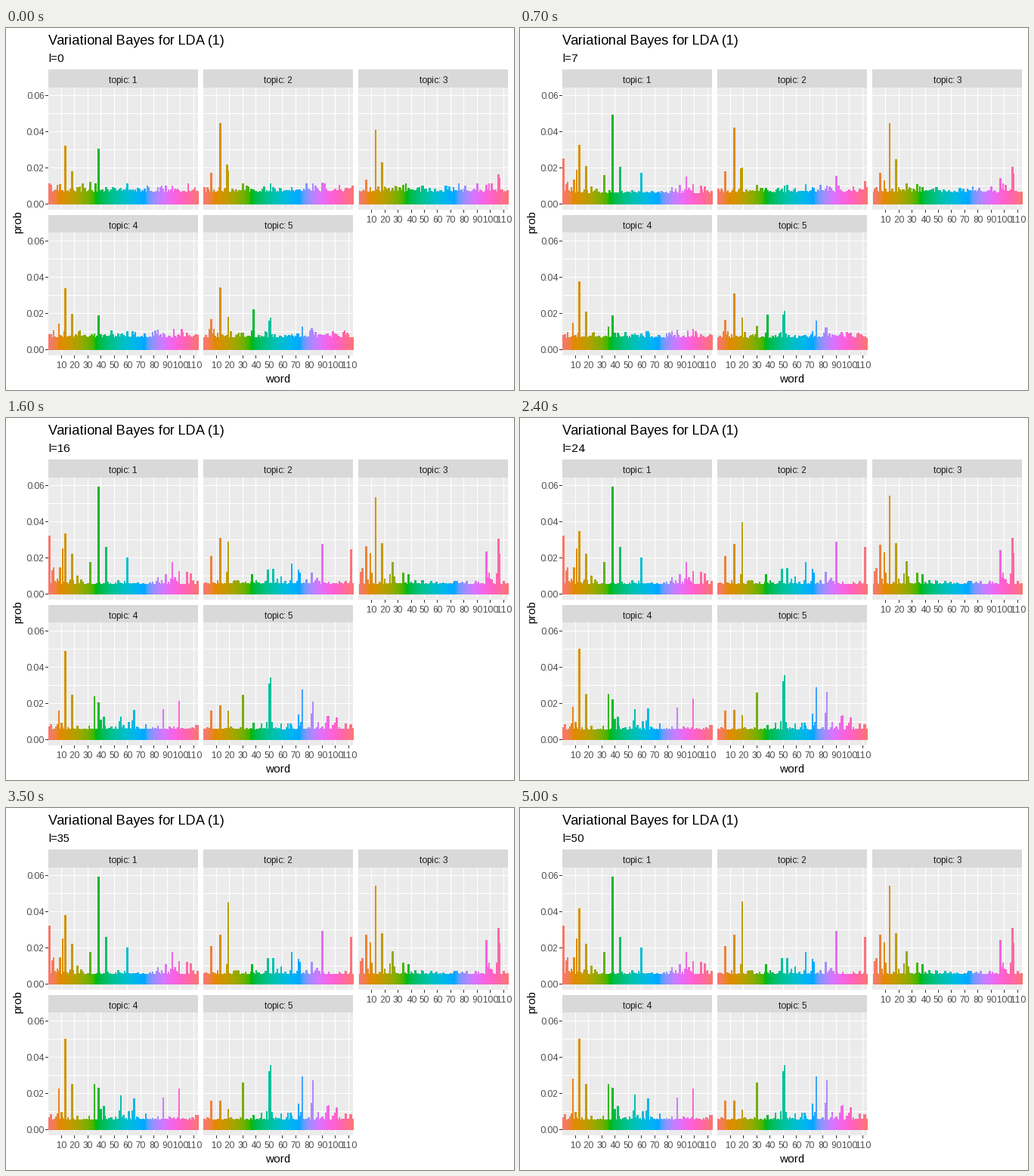
Animation, 672 px wide and 480 px high, one loop 5100 ms. Source, as a matplotlib script:

```python
import math

import matplotlib.pyplot as plt
import numpy as np
from matplotlib.animation import FuncAnimation
from matplotlib.collections import PolyCollection
from matplotlib.patches import Rectangle

W, H, DPI = 672, 480, 96
STEPS = 51
TOPICS, WORDS = 5, 113
PANEL_W, COL_STEP = 197.82, 205.13
WORD_PX = PANEL_W / (WORDS + 0.2)
PROB_PX = 2400

# Strip top, panel top, panel bottom and zero line of each row.
ROWS = [(55, 79, 241, 233.5), (248, 271, 434, 426.5)]

# Step at which each topic is half settled, and the word its small bars favour.
HALFWAY = [6, 10, 9, 10, 10]
FOCUS = [5, 60, 10, 35, 80]

# Leading words: word, first and last height in thousandths, own halfway step.
PEAKS = [
    [(1, 11, 32), (11, 7, 25), (13, 32, 43, 34), (18, 18, 22), (32, 12, 17.5),
     (38, 30, 59), (44, 9, 26), (60, 11, 20), (94, 10, 17.5)],
    [(6, 17, 21), (13, 45, 27, 12), (18, 22, 11), (19, 18, 45.5, 18),
     (67, 9, 17.5), (90, 11.5, 29), (112, 8.5, 26)],
    [(6, 13, 27), (9, 9, 23), (13, 40.5, 54), (18, 23, 28), (26, 8.5, 18),
     (97, 10, 24), (106, 16, 31), (107, 14, 22.5)],
    [(8, 14, 30, 34), (13, 33.5, 50), (18, 19.5, 25), (35, 8.5, 25),
     (38, 18.5, 23, 18), (55, 8, 19, 18), (65, 8, 17), (87, 9, 17.5), (99, 8, 22.5)],
    [(6, 16.5, 16), (13, 34.5, 16, 11), (19, 18, 11, 20), (30, 9, 26),
     (38, 22.5, 8), (50, 15.5, 32), (51, 17, 35.5), (75, 12, 29), (83, 10, 27, 14)],
]


def hue_color(i):
    """Evenly spaced hue at luminance 65 and chroma 100 (polar LUV)."""
    lum, chroma = 65, 100
    a = math.radians(15 + 360 * i / WORDS)
    y = ((lum + 16) / 116) ** 3
    u = chroma * math.cos(a) / (13 * lum) + 0.1978
    v = chroma * math.sin(a) / (13 * lum) + 0.4683
    x = 9 * y * u / (4 * v)
    z = -x / 3 - 5 * y + 3 * y / v
    lin = np.clip([3.2405 * x - 1.5371 * y - 0.4985 * z,
                   -0.9693 * x + 1.8760 * y + 0.0416 * z,
                   0.0556 * x - 0.2040 * y + 1.0572 * z], 0, 1)
    return np.where(lin <= 0.0031308, 12.92 * lin,
                    1.055 * lin ** (1 / 2.4) - 0.055)


rng = np.random.default_rng(12)
SIZE = (TOPICS, WORDS)

# Even noise at first; later a flat floor with bumps around each topic's focus.
FIRST = 6.5 + np.minimum(rng.exponential(1.3, SIZE), 5)
angle = 2 * np.pi * (np.arange(1, WORDS + 1) - np.array(FOCUS)[:, None]) / WORDS
spread = 0.15 + 0.85 * np.cos(angle / 2) ** 2
bumps = np.minimum(rng.exponential(3.5, SIZE), 9) * (rng.random(SIZE) < 0.5)
LAST = 5.4 + 0.3 * rng.random(SIZE) + bumps * spread


def blend(first, last, halfway, step):
    return first + (last - first) / (1 + math.exp(4 * (1 - step / halfway)))


def probs(topic, step):
    p = blend(FIRST[topic], LAST[topic], HALFWAY[topic], step)
    for word, first, last, *own in PEAKS[topic]:
        halfway = own[0] if own else HALFWAY[topic]
        p[word - 1] = blend(first, last, halfway, step)
    return p / 1000


def place(topic):
    """Column, row and left edge of a facet."""
    row, col = divmod(topic, 3)
    return col, row, 56.05 + col * COL_STEP


def word_x(left, word):
    return left + (word - 0.4) * WORD_PX


def bar_verts(topic, step):
    _, row, left = place(topic)
    zero = ROWS[row][-1]
    bottom = math.ceil(zero)
    half = 0.45 * WORD_PX
    verts = []
    for word, p in enumerate(probs(topic, step), 1):
        x = word_x(left, word)
        x0 = round(x - half)
        x1 = min(round(x + half), round(left + PANEL_W)) + 1
        top = round(zero - p * PROB_PX - 0.5)
        verts.append([(x0, bottom), (x1, bottom), (x1, top), (x0, top)])
    return verts


plt.rcParams["font.family"] = "Liberation Sans"
plt.rcParams["text.hinting_factor"] = 1  # whole-pixel letter spacing
fig = plt.figure(figsize=(W / DPI, H / DPI), dpi=DPI, facecolor="white")
ax = fig.add_axes([0, 0, 1, 1])
ax.set_xlim(0, W)
ax.set_ylim(H, 0)
ax.axis("off")


def rect(x0, y0, x1, y1, color):
    ax.add_patch(Rectangle((x0, y0), x1 - x0, y1 - y0, fc=color, lw=0,
                           antialiased=False))


def label(x, y, text, px, color="black", ha="center", **kw):
    return ax.text(x, y, text, fontsize=px * 72 / DPI, color=color, ha=ha, **kw)


def draw_facet(topic):
    col, row, left = place(topic)
    x0, x1 = round(left), round(left + PANEL_W)
    strip, top, bottom, zero = ROWS[row]
    rect(x0, strip, x1, top, "#D9D9D9")
    rect(x0, top, x1, bottom, "#EBEBEB")
    label(left + PANEL_W / 2, strip + 18, f"topic: {topic + 1}", 12, "#1A1A1A")

    for k in range(7):
        y = math.floor(zero - k * 0.01 * PROB_PX)
        rect(x0, y, x1, y + 1, "white")
        if col == 0 and k % 2 == 0:
            rect(x0 - 4, y, x0, y + 1, "#333333")
            label(50, y + 5, f"{k / 100:.2f}", 12, "#4D4D4D", "right")

    for word in range(10, WORDS, 10):
        x = round(word_x(left, word))
        rect(x, top, x + 1, bottom, "white")
        if row == 1 or col == 2:
            rect(x, bottom, x + 1, bottom + 4, "#333333")
            label(x + 0.5, bottom + 17, str(word), 12, "#4D4D4D")


for topic in range(TOPICS):
    draw_facet(topic)

label(56, 22, "Variational Bayes for LDA (1)", 18, ha="left")
subtitle = label(56, 45, "l=0", 15, ha="left")
label(360, 470, "word", 15)
label(16, 257, "prob", 15, rotation=90, va="center")

colors = [hue_color(i) for i in range(WORDS)]
bars = []
for topic in range(TOPICS):
    coll = PolyCollection(bar_verts(topic, 0), facecolors=colors, linewidths=0,
                          antialiaseds=False, zorder=2)
    ax.add_collection(coll, autolim=False)
    bars.append(coll)


def update(step):
    subtitle.set_text(f"l={step}")
    for topic, coll in enumerate(bars):
        coll.set_verts(bar_verts(topic, step))
    return [subtitle, *bars]


anim = FuncAnimation(fig, update, frames=STEPS, interval=100,
                     init_func=lambda: update(0), repeat=True, repeat_delay=0)
plt.show()
```
